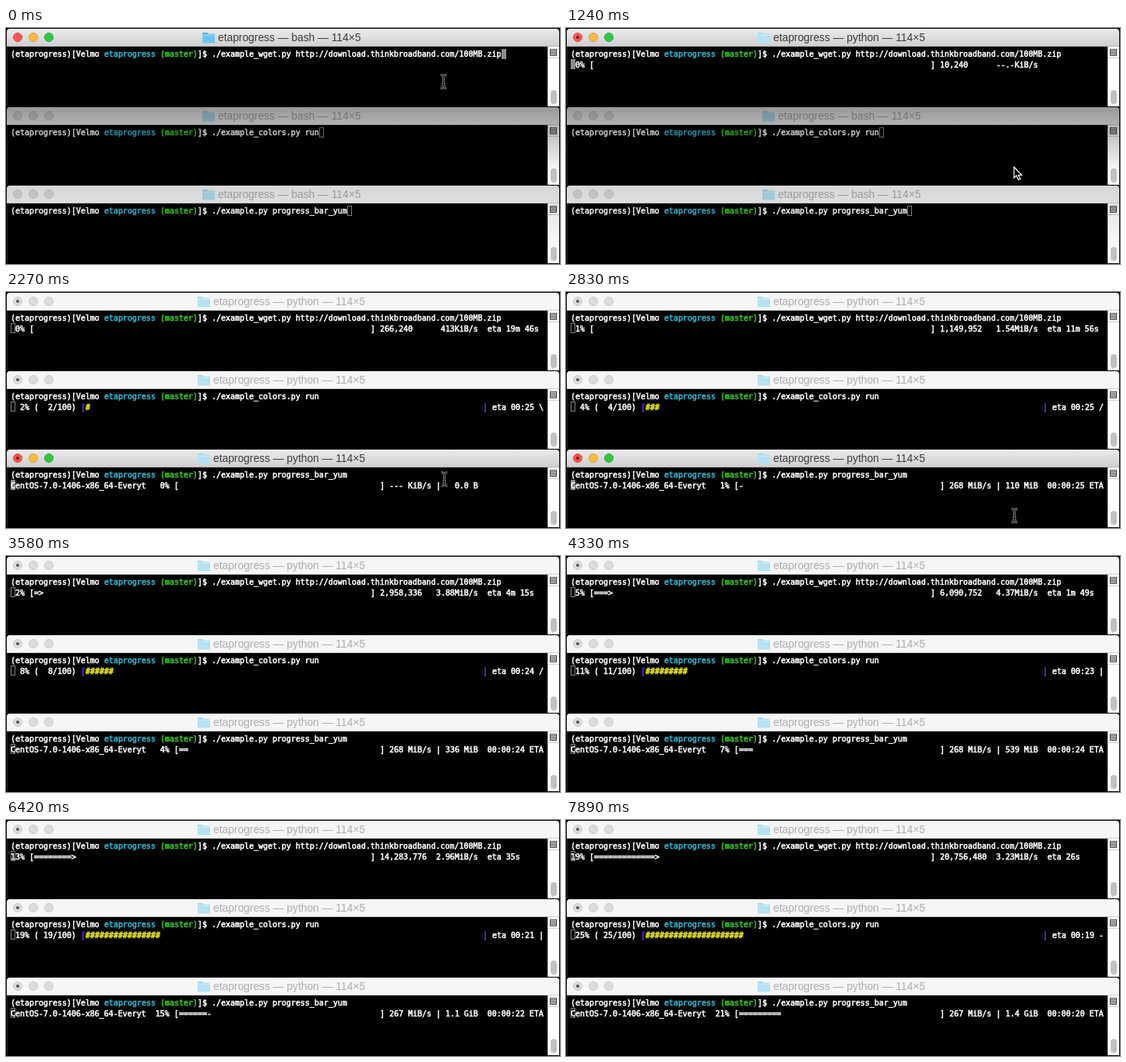
An HTML page with a canvas that plays this animation: 711x304 px, repeating every 8000 ms.

```html
<!DOCTYPE html>
<html lang="en">
<head>
<meta charset="utf-8">
<style>
html, body { margin: 0; width: 100%; height: 100%; overflow: hidden; background: #000; }
canvas { display: block; }
</style>
</head>
<body>
<canvas id="stage" width="711" height="304"></canvas>
<script>
const c = document.getElementById('stage').getContext('2d');
const LOOP = 8000, CELL = 6;
const MONO = '9.967px "DejaVu Sans Mono", monospace';
const SANS = '13.8px "Liberation Sans", Arial, sans-serif';
const WHITE = '#fff', CYAN = '#2eb6d2', GREEN = '#35cf25', YELLOW = '#f2ee1c', VIOLET = '#5a35e8';

// Screen refreshes: first, last, count
const ticks = [0];
for (const [a, b, n] of [[500, 650, 2], [950, 1980, 8], [2130, 3130, 8], [3280, 4180, 7],
  [4330, 5370, 8], [5520, 5820, 3], [6120, 6560, 4], [6860, 7300, 4], [7600, 7890, 3]])
  for (let i = 0; i < n; i++) ticks.push(Math.round((a + (b - a) * i / (n - 1)) / 10) * 10);

// Columns: time, KiB loaded, KiB/s, log of seconds left
const download = [[1240, 10, 60, 2400], [2270, 260, 413, 1186], [3580, 2889, 3973, 255],
  [5070, 8966, 4966, 47], [6410, 13949, 3031, 35], [7890, 20270, 3308, 26]]
  .map(([t, k, r, s]) => [t, k, r, Math.log(s)]);
const iso = [[2270, 0], [3580, 336], [5070, 740], [6410, 1078], [7890, 1445]];
const pointer = [[650, 561, 69], [950, 563, 92], [1240, 579, 187], [1530, 579, 187],
  [1830, 562, 241], [2420, 562, 241], [2710, 575, 290]];

function sample(keys, t) {
  let i = 0;
  while (i < keys.length - 2 && t >= keys[i + 1][0]) i++;
  const a = keys[i], b = keys[i + 1];
  const f = Math.min(1, Math.max(0, (t - a[0]) / (b[0] - a[0])));
  return a.map((v, j) => v + (b[j] - v) * f);
}

function rect(x, y, w, h, fill) {
  c.fillStyle = fill;
  c.fillRect(x, y, w, h);
}

function round(x, y, w, h, r, fill) {
  c.fillStyle = fill;
  c.beginPath();
  c.roundRect(x, y, w, h, r);
  c.fill();
}

function disc(x, y, r, fill, line) {
  c.beginPath();
  c.arc(x, y, r, 0, 7);
  c.fillStyle = fill;
  c.fill();
  if (line) {
    c.strokeStyle = line;
    c.lineWidth = 1;
    c.stroke();
  }
}

function fade(y, h, from, to) {
  const g = c.createLinearGradient(0, y, 0, y + h);
  g.addColorStop(0, from);
  g.addColorStop(1, to);
  return g;
}

function put(win, row, col, text, color = WHITE) {
  const x = 6 + col * CELL, y = 37 + win * 101 + row * 14;
  c.font = MONO;
  c.fillStyle = c.strokeStyle = color;
  c.lineWidth = 0.55;
  c.fillText(text, x, y);
  c.strokeText(text, x, y);
}

function caret(win, row, col, active) {
  const x = 6 + col * CELL, y = 27 + win * 101 + row * 13;
  if (active) return rect(x, y, 6, 13, '#8c8c8c');
  c.strokeStyle = '#858585';
  c.lineWidth = 1;
  c.strokeRect(x + 0.5, y + 0.5, 5, 12);
}

function frame(win, active, running) {
  const y = 1 + win * 101;
  round(1, y, 709, 22, [4, 4, 0, 0], active ? fade(y, 22, '#ebebeb', '#d0d0d0') : '#f6f6f6');
  rect(1, y + 22, 709, 1, active ? '#b1b1b1' : '#d2d2d2');

  const lamps = active ? ['#fc5650', '#fdbb3d', '#33c748'] : ['#dcdcdc', '#dcdcdc', '#dcdcdc'];
  const rims = active ? ['#df4744', '#dd9f34', '#27a934'] : ['#cacaca', '#cacaca', '#cacaca'];
  lamps.forEach((fill, i) => disc(15 + i * 20, y + 11, 5.5, fill, rims[i]));
  if (running) disc(15, y + 11, 2, active ? '#7d1512' : '#555');

  const title = `etaprogress — ${running ? 'python' : 'bash'} — 114×5`;
  const x = running ? 246 : 252, vivid = active && !running;
  round(x, y + 5, 7, 5, 1, vivid ? '#4fb0e0' : '#a6d6ea');
  round(x, y + 6.5, 16, 12, 1, vivid ? '#69c6f3' : '#b5e1f2');
  rect(x, y + 8, 16, 1, vivid ? '#8fd8fb' : '#cdecf7');
  c.font = SANS;
  c.fillStyle = active ? '#3c3c3c' : '#acacac';
  c.fillText(title, x + 20, y + 16);

  // Scroll bar with its split button
  rect(695, y + 23, 15, 77, '#fcfcfc');
  rect(695, y + 23, 1, 77, '#dedede');
  rect(695, y + 37, 15, 1, '#d0d0d0');
  rect(698, y + 26, 9, 9, '#4a4a4a');
  rect(699, y + 27, 7, 7, '#dcdcdc');
  for (let i = 0; i < 3; i++) rect(699, y + 28 + i * 2, 7, 1, '#555');
  round(699, y + 79, 8, 18, 4, '#c1c1c1');
}

function prompt(win, command) {
  put(win, 0, 0, '(etaprogress)[Velmo ');
  put(win, 0, 20, 'etaprogress', CYAN);
  put(win, 0, 32, '(master)', GREEN);
  put(win, 0, 40, ']$ ' + command);
}

function wgetLine(t) {
  const [, k, rate, logEta] = sample(download, t);
  const bytes = Math.round(k) * 1024, part = bytes / 104857600;
  const n = Math.floor(part * 72);
  const speed = t < 1800 ? '--.-KiB/s'
    : rate < 1024 ? Math.round(rate) + 'KiB/s' : (rate / 1024).toFixed(2) + 'MiB/s';
  const s = Math.round(Math.exp(logEta));
  const eta = t < 1800 ? '' : 'eta ' + (s >= 60 ? `${Math.floor(s / 60)}m ` : '') + s % 60 + 's';
  put(0, 1, 0, String(Math.floor(part * 100)).padStart(2) + '% [');
  put(0, 1, 5, n ? '='.repeat(n - 1) + '>' : '');
  put(0, 1, 77, `] ${bytes.toLocaleString('en-US').padEnd(10)}  ${speed.padStart(9)}  ${eta}`);
}

function colorLine(t) {
  const p = Math.max(0, Math.floor((t - 1545) * 0.004));
  const eta = p ? '00:' + Math.ceil((100 - p) / 3.99) : '--:--';
  put(1, 1, 0, `${String(p).padStart(3)}% (${String(p).padStart(3)}/100)`);
  put(1, 1, 15, '[', VIOLET);
  put(1, 1, 16, '#'.repeat(p * 0.85), YELLOW);
  put(1, 1, 101, ']', VIOLET);
  put(1, 1, 103, `eta ${eta} ${'/-\\|'[p % 4]}`);
}

function yumLine(t) {
  const mib = sample(iso, t)[1], total = 6748, part = mib / total;
  const n = part * 43, rate = t < 5700 ? 268 : 267;
  const size = mib < 1024 ? Math.round(mib) + ' MiB' : (mib / 1024).toFixed(1) + ' GiB';
  const eta = '00:00:' + Math.ceil((total - mib) / rate);
  put(2, 1, 0, `CentOS-7.0-1406-x86_64-Everyt  ${String(Math.floor(part * 100)).padStart(2)}% [`);
  put(2, 1, 36, '='.repeat(n) + (n % 1 >= 0.5 ? '-' : ''));
  put(2, 1, 79, mib ? `] ${rate} MiB/s | ${size.padStart(7)}  ${eta} ETA` : '] --- KiB/s |   0.0 B');
}

// Shadow that the active window casts on those below it
function shadow(active) {
  [0.38, 0.13].forEach((alpha, i) => {
    const y = 102 + (active + i) * 101;
    round(1, y, 709, 100, [4, 4, 0, 0], fade(y, 85, `rgba(0,0,0,${alpha})`, 'rgba(0,0,0,0)'));
  });
}

function mouse(t, active) {
  if (t >= 2800) return;
  const [, x, y] = sample(pointer, t);
  c.save();
  c.translate(Math.round(x), Math.round(y));
  c.beginPath();
  if (Math.floor((y - 1) / 101) === active) {
    c.moveTo(-3.5, -8.5);
    c.quadraticCurveTo(0.5, -8.5, 0.5, -5);
    c.quadraticCurveTo(0.5, -8.5, 4.5, -8.5);
    c.moveTo(0.5, -6);
    c.lineTo(0.5, 6);
    c.moveTo(-3.5, 8.5);
    c.quadraticCurveTo(0.5, 8.5, 0.5, 5);
    c.quadraticCurveTo(0.5, 8.5, 4.5, 8.5);
    c.moveTo(-2, 3.5);
    c.lineTo(3, 3.5);
    c.strokeStyle = '#777';
    c.lineWidth = 3;
    c.stroke();
    c.strokeStyle = '#111';
    c.lineWidth = 1;
    c.stroke();
  } else {
    [[-4, -8], [-4, 6], [-1, 3], [1.5, 8.5], [4, 7.5], [1.5, 2.5], [6, 2.5]]
      .forEach(p => c.lineTo(...p));
    c.closePath();
    c.fillStyle = '#000';
    c.fill();
    c.strokeStyle = '#fff';
    c.lineWidth = 1.2;
    c.stroke();
  }
  c.restore();
}

const shells = [
  { command: './example_wget.py http://download.thinkbroadband.com/100MB.zip', enter: 500, start: 650, line: wgetLine },
  { command: './example_colors.py run', enter: 1530, start: 1530, line: colorLine },
  { command: './example.py progress_bar_yum', enter: 1980, start: 2130, line: yumLine }
];

function draw(t) {
  const active = t < 1390 ? 0 : t < 1830 ? 1 : t < 2840 ? 2 : -1;
  rect(0, 0, 711, 304, '#000');
  shells.forEach(({ command, enter, start, line }, i) => {
    const running = t >= enter;
    frame(i, i === active, running);
    rect(1, 24 + i * 101, 1, 77, '#2a2a2a');
    caret(i, running ? 1 : 0, running ? 0 : 43 + command.length, i === active);
    prompt(i, command);
    if (t >= start) line(t);
  });
  if (active >= 0) shadow(active);
  mouse(t, active);
}

function loop(now) {
  const t = now % LOOP;
  draw(ticks.findLast(k => k <= t));
  requestAnimationFrame(loop);
}
draw(0);
requestAnimationFrame(loop);
</script>
</body>
</html>
```
